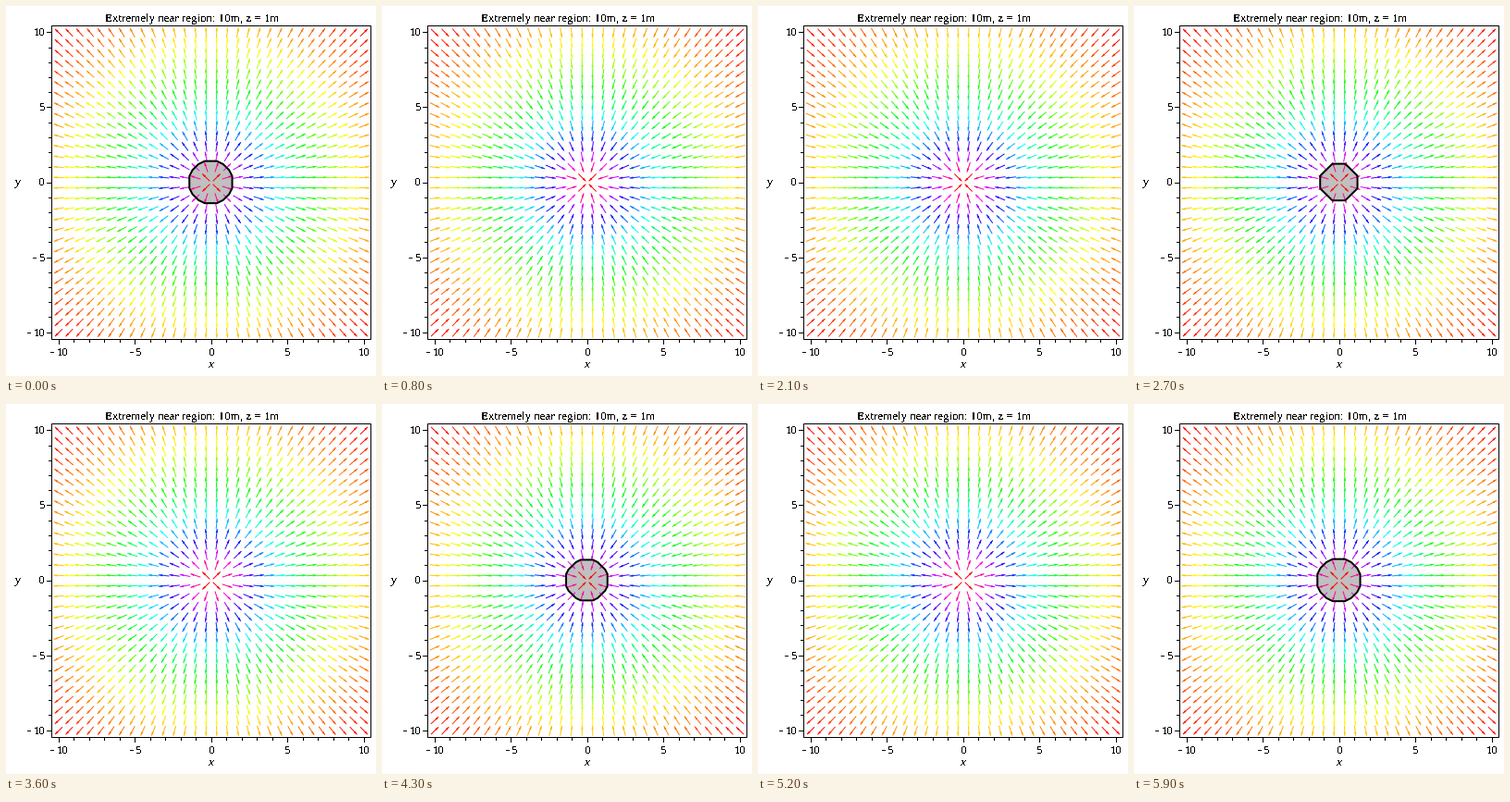
These frames come from a looping animation (400x400 px, 6000 ms). A matplotlib script:

```python
import numpy as np
import matplotlib.pyplot as plt
from matplotlib.animation import FuncAnimation
from matplotlib.collections import LineCollection, PolyCollection
from matplotlib.colors import hsv_to_rgb
from matplotlib.patches import Rectangle

SIZE, DPI = 400, 100
FRAMES, INTERVAL = 60, 100
PX = 72 / DPI                    # one pixel in points
CX, CY = 222, 191                # plot origin in pixels
SX, SY = 16.5, 16.22             # pixels per unit
FONT = 13 * PX

plt.rcParams["font.family"] = "Liberation Serif"
plt.rcParams["text.antialiased"] = False
fig = plt.figure(figsize=(SIZE / DPI, SIZE / DPI), dpi=DPI, facecolor="white")
ax = fig.add_axes([0, 0, 1, 1])
ax.set_xlim(0, SIZE)
ax.set_ylim(SIZE, 0)
ax.axis("off")


def to_px(x, y):
    return CX + SX * x, CY - SY * y


def label(x, y, text, ha="left", **kw):
    ax.text(x, y, text, fontsize=FONT, ha=ha, va="baseline", **kw)


def number(x, y, value, align):
    """Tick number with a loosely set minus sign."""
    digits = str(abs(value))
    sign = 7 if value < 0 else 0
    width = sign + 6.5 * len(digits)
    left = x - width * align
    if sign:
        label(left, y, "-")
    label(left + sign, y, digits)


def tick(xs, ys):
    ax.plot(xs, ys, color="black", lw=PX, snap=False,
            solid_capstyle="butt")


def draw_axes():
    ax.add_patch(Rectangle((49.5, 21.5), 345, 339, fill=False,
                           ec="black", lw=PX, snap=False, zorder=5))
    for v in range(-10, 11):
        x, y = to_px(v, v)
        col, row = np.floor(x) + 0.5, np.floor(y) + 0.5
        size = 3 if v % 5 else 5
        tick([col, col], [360.5, 361 + size])
        tick([49 - size, 49.5], [row, row])
        if v % 5 == 0:
            number(x + 0.5, 378, v, 0.5)
            number(42.5, y + 3.5, v, 1)
    label(201, 17, "Extremely near region: 10m, z = 1m", ha="center")
    label(222, 391, "x", ha="center", style="italic")
    label(13, 194, "y", ha="center", style="italic")


draw_axes()

# Arrow field: arrows one grid step long, coloured by strength
N = 30
gx, gy = (g.ravel() for g in np.meshgrid(*[np.linspace(-10, 10, N)] * 2))
r = np.hypot(gx, gy)
mid = np.column_stack(to_px(gx, gy))
step = np.array([SX, -SY]) * 20 / (N - 1)
vec = np.column_stack([gx / r, gy / r]) * step
unit = vec / np.linalg.norm(vec, axis=1, keepdims=True)
side = np.column_stack([-unit[:, 1], unit[:, 0]])

strength = np.exp(-r / 7)
hue = (strength - strength.min()) / np.ptp(strength)
colors = hsv_to_rgb(np.column_stack([hue, np.ones_like(hue), np.ones_like(hue)]))

shafts = LineCollection([], colors=colors, linewidths=PX,
                        capstyle="butt", zorder=3)
heads = PolyCollection([], facecolors=colors, edgecolors="none", zorder=3)
ax.add_collection(shafts, autolim=False)
ax.add_collection(heads, autolim=False)


def set_arrows(sign):
    tip = mid + sign * vec / 2
    tail = mid - sign * vec / 2
    base = tip - sign * 4 * unit
    shafts.set_segments(np.stack([tail, tip], axis=1))
    heads.set_verts(np.stack([tip, base + 1.2 * side, base - 1.2 * side], axis=1))


# The disc outline is contoured on a coarse grid, which makes it angular
DX, DY = np.meshgrid(*[np.linspace(-10, 10, 26)[9:17]] * 2)
dist2 = DX**2 + DY**2
disc_px = [p - 0.6 for p in to_px(DX, DY)]
disc = []


def update(i):
    wave = np.cos(4 * np.pi * i / (FRAMES - 1))
    set_arrows(1 if wave > 0 else -1)
    while disc:
        disc.pop().remove()
    level = (1.5 * wave) ** 2
    if level > dist2.min():
        disc.append(ax.contourf(*disc_px, dist2, levels=[0, level],
                                colors=["#c0c0c0"], zorder=2))
        disc.append(ax.contour(*disc_px, dist2, levels=[level],
                               colors="black", linewidths=2 * PX, zorder=4))
    ax.set_xlim(0, SIZE)
    ax.set_ylim(SIZE, 0)
    return []


anim = FuncAnimation(fig, update, frames=FRAMES, interval=INTERVAL,
                     repeat=True, repeat_delay=0, blit=False)
plt.show()
```
